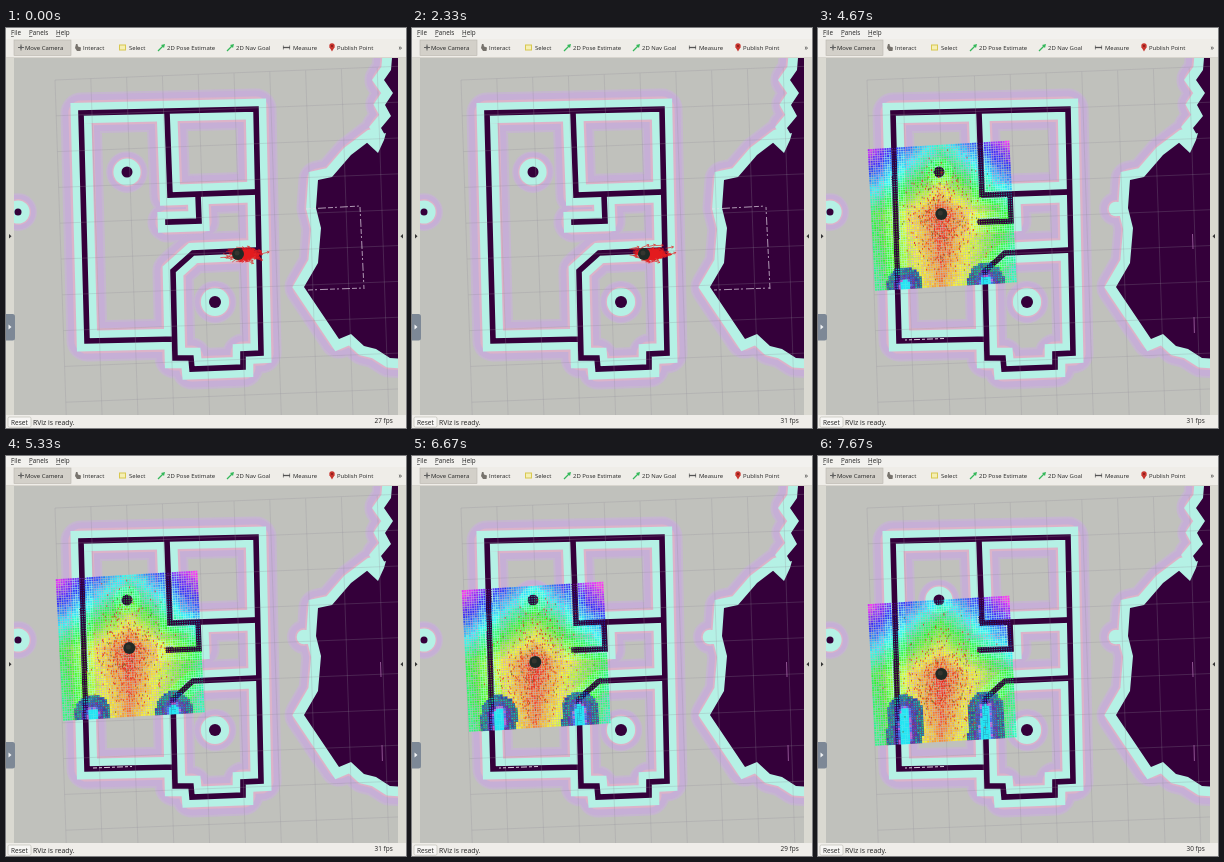
An HTML page with a canvas that plays this animation: 400 by 400 pixels, repeating every 8000 ms.

```html
<!DOCTYPE html>
<html lang="en">
<head>
<meta charset="utf-8">
<title>Robot localization</title>
<style>
html, body { margin: 0; width: 100%; height: 100%; overflow: hidden; background: #efede9; }
canvas { display: block; width: 400px; height: 400px; }
</style>
</head>
<body>
<canvas id="view"></canvas>
<script>
const LOOP = 8000, STEP = 1000 / 3, TAU = Math.PI * 2;
const canvas = document.getElementById('view');
const ratio = Math.max(1, window.devicePixelRatio || 1);
canvas.width = canvas.height = 400 * ratio;
const g = canvas.getContext('2d');
g.scale(ratio, ratio);

const DARK = '#34003a', CYAN = '#b5f1e5';

const walls = [
  [[161, 85], [164, 167], [250, 164]],
  [[192, 167], [193, 193], [162, 194]],
  [[168, 311], [81, 313], [75, 85], [250, 81], [255, 325], [237, 326], [237, 339],
   [186, 341], [185, 330], [169, 330], [167, 243], [187, 225], [252, 222]]
];
const posts = [[121, 144, 5.5], [209, 274, 6], [12, 184, 3.5]];
const unknown = [[400, 26], [386, 30], [385, 42], [378, 52], [387, 65], [379, 77], [385, 88],
  [375, 100], [379, 107], [366, 111], [345, 127], [326, 149], [312, 152], [310, 180],
  [315, 200], [312, 235], [298, 259], [333, 311], [345, 306], [358, 318], [370, 321],
  [384, 330], [400, 331]];
const pillars = [[87, 257], [168, 253]];
const squareTops = [112, 114, 114, 114, 121, 121, 125, 132, 132, 139];
const robotYs = [186, 189, 192, 196, 200, 203, 206, 210, 214, 218];

function random(seed) {
  return () => {
    seed = seed + 0x6D2B79F5 | 0;
    let n = Math.imul(seed ^ seed >>> 15, 1 | seed);
    n = n + Math.imul(n ^ n >>> 7, 61 | n) ^ n;
    return ((n ^ n >>> 14) >>> 0) / 4294967296;
  };
}
const bell = rnd => Math.sqrt(-2 * Math.log(1 - rnd())) * Math.cos(TAU * rnd());

function trace(points, close) {
  g.beginPath();
  points.forEach(([x, y]) => g.lineTo(x, y));
  if (close) g.closePath();
}
function line(points, color, width) {
  trace(points);
  g.strokeStyle = color;
  g.lineWidth = width;
  g.stroke();
}
function disc(x, y, r, color) {
  g.beginPath();
  g.arc(x, y, r, 0, TAU);
  g.fillStyle = color;
  g.fill();
}
function box(x, y, w, h, color) {
  g.fillStyle = color;
  g.fillRect(x, y, w, h);
}
function shape(points, color) {
  trace(points, true);
  g.fillStyle = color;
  g.fill();
}

// Inflation layers, widest first, then the occupied cells
function drawMap(bump) {
  const layers = [[20.5, '#c5b7cf'], [18.5, '#c6afd6'], [12.6, '#dcb3c9'], [10.8, CYAN]];
  for (const [r, color] of layers) {
    g.lineJoin = r > 12 ? 'round' : 'miter';
    g.lineCap = r > 12 ? 'round' : 'square';
    walls.forEach(w => line(w, color, r * 2 - (g.lineCap === 'square' ? 1 : 0)));
    posts.forEach(([x, y, p]) => disc(x, y, r * .75 + p, color));
    g.miterLimit = 3;
    trace(unknown, true);
    g.strokeStyle = color;
    g.lineWidth = r * 2 - 2;
    g.stroke();
    if (bump) disc(298, 181, r - 3.5, color);
  }
  if (bump) box(297, 174, 14, 14, CYAN);
  g.lineCap = 'square';
  g.lineJoin = 'miter';
  walls.forEach(w => line(w, DARK, 5.6));
  posts.forEach(([x, y, r]) => disc(x, y, r, DARK));
  shape(unknown, DARK);
  shape([[357, 111], [380, 105], [378, 112], [372, 125]], CYAN);
  g.lineCap = 'butt';
}

function drawGrid() {
  for (let i = 0; i <= 10; i++) {
    const d = i * 35.8;
    line([[49 + d, 52 - d * .038], [61 + d, 410 - d * .038]], 'rgba(145,140,150,.36)', .7);
    line([[49 + d * .034, 52 + d], [400 + d * .034, 38 + d]], 'rgba(145,140,150,.36)', .7);
  }
}

function drawScan(k) {
  g.lineCap = 'butt';
  if (k < 12) {
    g.setLineDash([5, 2, 2, 3, 8, 2]);
    g.lineDashOffset = k % 3 * 2;
    const c = 'rgba(235,225,238,.85)';
    line([[300, 181], [354, 178]], c, .8);
    line([[354, 179], [358, 261]], c, .8);
    line([[302, 262], [358, 260]], c, .8);
  } else {
    g.setLineDash([6, 2, 3, 2]);
    g.lineDashOffset = k % 3 * 2;
    line([[87, 312], [126, 310.5]], '#eee8f0', .9);
    g.setLineDash([]);
    line([[374.5, 206], [375, 221]], '#a869aa', .8);
    line([[376, 289], [376.4, 305]], '#a869aa', .8);
  }
  g.setLineDash([]);
}

function drawArrows(cx, cy, sx, sy, count, heading, spread, size, seed) {
  const rnd = random(seed);
  g.beginPath();
  for (let i = 0; i < count; i++) {
    const x = cx + bell(rnd) * sx, y = cy + bell(rnd) * sy;
    const a = heading + bell(rnd) * spread;
    const tx = x + Math.cos(a) * size, ty = y + Math.sin(a) * size;
    g.moveTo(x, y);
    g.lineTo(tx, ty);
    for (const side of [-2.6, 2.6]) {
      g.moveTo(tx, ty);
      g.lineTo(tx + Math.cos(a + side) * 2.4, ty + Math.sin(a + side) * 2.4);
    }
  }
  g.strokeStyle = '#e41c20';
  g.lineWidth = .65;
  g.stroke();
}

function drawRobot(x, y) {
  disc(x, y, 6, '#202a26');
  disc(x - 1, y - 1, 2.5, '#35352f');
}

function drawPillars() {
  const rnd = random(41);
  for (const [cx, cy] of pillars) {
    for (let x = -19; x < 19; x += 1.8) {
      for (let y = -19; y < 5; y += 1.8) {
        const d = Math.hypot(x, Math.min(0, y)), n = rnd();
        if (d > 18.5 || (y > 0 && d > 7 && n < .5)) continue;
        const color = d < 7 ? '#20e6f4' : d < 9.5 ? '#e2657c' : d < 12 ? '#5b50d8'
          : n < .65 ? '#5917a8' : '#3c168c';
        box(cx + x, cy + y, 1.75, 1.75, color);
      }
    }
  }
}

function segmentDistance(x, y, [ax, ay], [bx, by]) {
  const dx = bx - ax, dy = by - ay;
  const t = Math.max(0, Math.min(1, ((x - ax) * dx + (y - ay) * dy) / (dx * dx + dy * dy)));
  return Math.hypot(x - ax - t * dx, y - ay - t * dy);
}
function blocked(x, y) {
  return posts.some(([px, py, r]) => Math.hypot(x - px, y - py) < r) ||
    walls.some(w => w.some((p, i) => i && segmentDistance(x, y, w[i - 1], p) < 3.2));
}

// Tent-shaped cost: low along the way ahead, rising to the far corners
function drawCosts(top, ry) {
  const rnd = random(7), N = 60;
  for (let j = 0; j < N; j++) {
    for (let i = 0; i < N; i++) {
      const u = (i + .5) / N, v = (j + .5) / N;
      const x = 49.5 + u * 142 + v * 7.4, y = top + 9 - u * 8.6 + v * 142;
      const dx = Math.abs(x - 123), dy = y - ry, n = rnd(), m = rnd();
      let cost = .4 * dx / 72 + .5 * Math.max(0, -dy) / 70 + .08 * Math.max(0, dy) / 70;
      cost += (n - .5) * .05;
      let color = `hsl(${Math.min(302, cost * 335)},95%,${56 + m * 6}%)`, size = 1.9;
      const d = Math.min(...pillars.map(([px, py]) => Math.hypot(x - px, Math.min(0, y - py))));
      if (d < 18) {
        if (d < 4.5) { color = '#25e4f3'; size = 2.5; }
        else if (d < 6.5) { color = n < .5 ? '#b061d9' : '#4b6de8'; size = 2.3; }
        else {
          box(x - 1.2, y - 1.2, 2.4, 2.4, 'rgba(35,10,70,.68)');
          color = d < 11 ? (n < .6 ? '#326ae4' : '#6a30cf') : `hsl(${150 + n * 70},80%,43%)`;
          size = 1.6;
        }
      } else if (blocked(x, y)) {
        color = `hsl(${Math.min(290, cost * 335 + 15)},80%,38%)`;
        size = 1.1;
      }
      box(x - size / 2, y - size / 2, size, size, color);
    }
  }
  const spots = random(19 + ry);
  for (let i = 0; i < 430; i++) {
    const x = 123 + bell(spots) * 17, y = ry + 5 + bell(spots) * 25, n = spots();
    if (y < top + 6 || y > top + 143) continue;
    box(x, y, .9, 1.7, n < .75 ? 'rgba(228,40,20,.8)' : 'rgba(95,75,20,.65)');
  }
}

function label(text, x, y, size, color = '#222') {
  g.font = `${size}px "Open Sans", "Noto Sans", sans-serif`;
  g.fillStyle = color;
  g.fillText(text, x, y);
}

function drawIcons() {
  line([[12, 19.5], [18, 19.5]], '#444', .8);
  line([[15, 16.5], [15, 22.5]], '#444', .8);
  disc(15, 19.5, 1.2, '#666');
  shape([[70, 16], [71.5, 16], [72, 18.5], [75, 19.5], [74.5, 23], [71, 23], [69, 20]], '#77736d');
  box(113, 16.5, 7, 6, '#d8c84f');
  box(114, 17.5, 5, 4, '#f5efb4');
  for (const x of [152, 221]) {
    line([[x, 23], [x + 5, 18]], '#35b85a', 1.2);
    shape([[x + 7, 16], [x + 6, 20], [x + 3, 17]], '#35b85a');
  }
  line([[277, 19.5], [284, 19.5]], '#555', 1.3);
  line([[277.4, 17.5], [277.4, 21.5]], '#555', .7);
  line([[283.6, 17.5], [283.6, 21.5]], '#555', .7);
  shape([[323.4, 19], [328.6, 19], [326, 23.5]], '#c8352e');
  disc(326, 18, 2.7, '#c8352e');
  disc(326, 18, .9, '#7c1714');
}

function drawWindow(fps) {
  box(0, 0, 400, 11, '#f2f1ee');
  box(0, 11, 400, 19, '#efede8');
  box(0, 29, 400, .8, '#d2d0c9');
  box(0, 30, 8, 357, '#dad9d1');
  box(392, 30, 8, 357, '#dad9d1');
  box(0, 387, 400, 13, '#efede9');
  [['File', 5, 2.8], ['Panels', 23, 3.4], ['Help', 50, 4.3]].forEach(([text, x, w]) => {
    label(text, x, 7.4, 6.3);
    box(x, 8.4, w, .6, '#333');
  });
  box(8, 12, 57, 15.5, '#d3d0c9');
  g.strokeStyle = '#b9b6ae';
  g.lineWidth = .6;
  g.strokeRect(8, 12, 57, 15.5);
  drawIcons();
  [['Move Camera', 19], ['Interact', 77], ['Select', 123], ['2D Pose Estimate', 161],
   ['2D Nav Goal', 230], ['Measure', 287], ['Publish Point', 331]]
    .forEach(([text, x]) => label(text, x, 21.6, 5.95));
  label('»', 392.5, 21.6, 7);
  shape([[3, 206], [5.5, 208.3], [3, 210.6]], '#333');
  shape([[397, 206], [394.5, 208.3], [397, 210.6]], '#333');
  g.beginPath();
  g.roundRect(-3, 286, 12, 26.5, 2.5);
  g.fillStyle = '#7d8896';
  g.fill();
  shape([[2.5, 296.5], [5.5, 299], [2.5, 301.5]], '#f2f4f6');
  g.beginPath();
  g.roundRect(2, 389, 23, 10.2, 1.5);
  g.fillStyle = '#f7f6f4';
  g.fill();
  g.strokeStyle = '#b8b5ad';
  g.lineWidth = .6;
  g.stroke();
  label('Reset', 5, 396.6, 6.5);
  label('RViz is ready.', 27, 396.6, 6.9);
  label(fps + ' fps', 368.6, 395, 6.4);
}

function fpsAt(k) {
  if (k < 2) return 27;
  if (k < 5) return 17;
  if (k < 8) return 31;
  if (k < 14) return 27;
  if (k < 20) return 31;
  return k < 23 ? 29 : 30;
}

function draw(k) {
  g.save();
  g.beginPath();
  g.rect(8, 30, 384, 357);
  g.clip();
  box(0, 30, 400, 360, '#c0c1bc');
  drawMap(k >= 8);
  drawGrid();
  drawScan(k);
  if (k < 10) {
    drawArrows(235, 226, 7, 2.7, 230, 0, .25, 8, 3 + k);
    drawRobot(232, 226);
  } else if (k < 14) {
    drawPillars();
    drawArrows(121, 186, 20, 20, 1150, Math.PI / 2, .35, 7, 11);
    if (k < 11) drawRobot(232, 226);
    else if (k < 12) drawRobot(216, 220);
    else drawRobot(123, 186);
  } else {
    drawCosts(squareTops[k - 14], robotYs[k - 14]);
    drawRobot(123.3, robotYs[k - 14]);
  }
  g.restore();
  drawWindow(fpsAt(k));
}

let shown = -1;
function tick(now) {
  const k = Math.min(23, Math.floor((now % LOOP + 4) / STEP));
  if (k !== shown) draw(shown = k);
  requestAnimationFrame(tick);
}
tick(performance.now());
</script>
</body>
</html>
```
